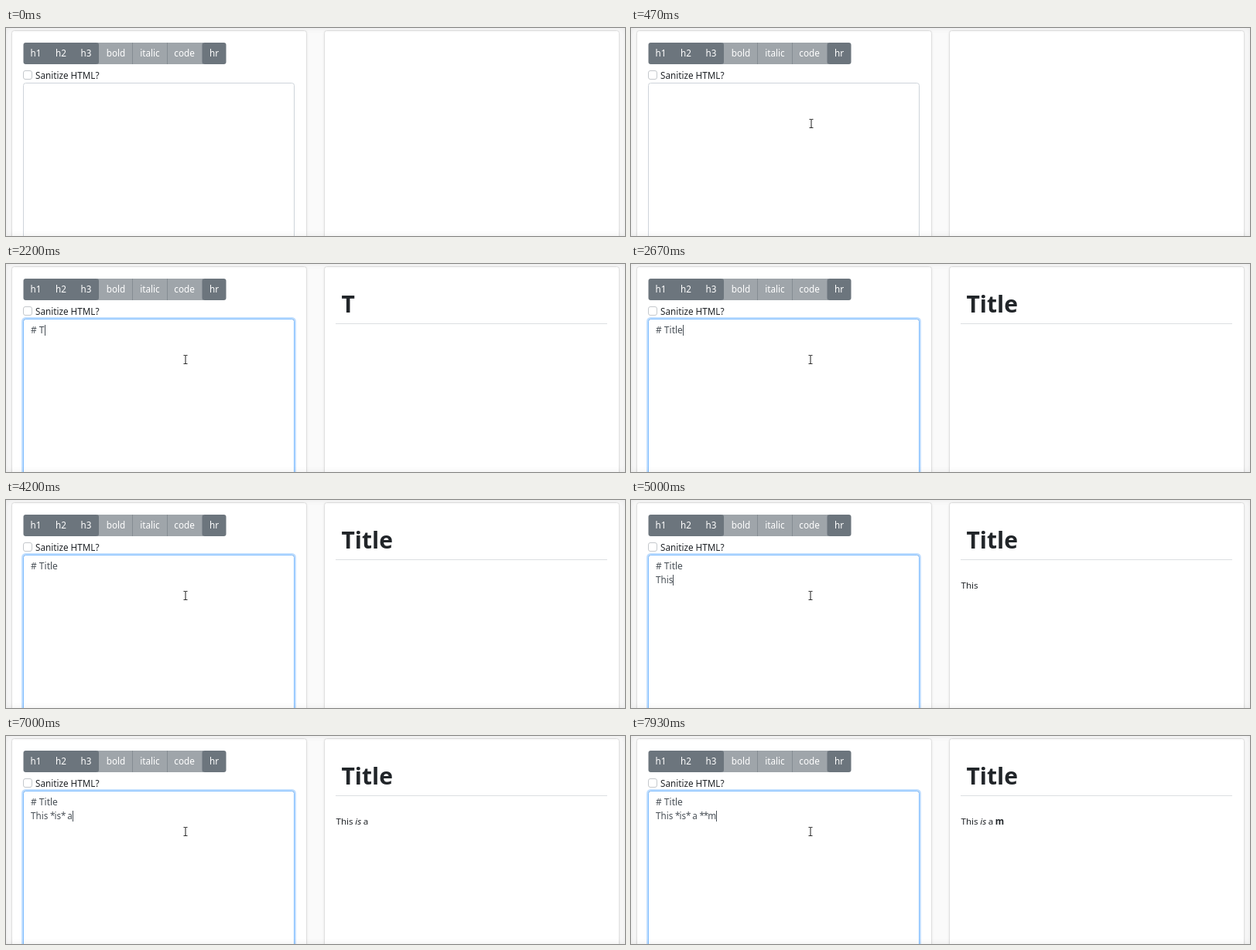
Recreate the animation shown at these times as an HTML page. Size 800 by 270 pixels, loop 8000 ms.

```html
<!DOCTYPE html>
<html lang="en">
<head>
<meta charset="utf-8">
<title>Markdown editor</title>
<style>
  html, body { margin: 0; width: 100%; height: 100%; overflow: hidden; background: #fafafa; }
  svg { display: block; width: 100%; height: 100%; }
  text { font: 11.7px "Noto Sans", "Open Sans", sans-serif; white-space: pre; fill: #212529; }
  .card { fill: #fff; stroke: #dfdfdf; filter: drop-shadow(0 1px 1.5px rgba(0, 0, 0, .07)); }
  .btn text { fill: #fff; text-anchor: middle; }
  .src text { fill: #495057; word-spacing: -.3px; }
  .src .first { font-size: 12px; word-spacing: 0; }
  .star { letter-spacing: -1.1px; }
  .title { font-size: 30px; font-weight: 600; }
  .para { font-size: 11.6px; word-spacing: -.5px; }
  .em { font-style: italic; }
  .strong { font-weight: 700; }
  .vignette { position: fixed; inset: 0; pointer-events: none; box-shadow: inset 0 0 8px rgba(0, 0, 0, .08); }
</style>
</head>
<body>
<svg viewBox="0 0 800 270">
  <rect class="card" x="7.5" y="3.5" width="381" height="300" rx="3"/>
  <rect class="card" x="411.5" y="3.5" width="381" height="300" rx="3"/>

  <g class="btn">
    <rect x="118" y="19" width="137" height="28" fill="#9fa5aa"/>
    <path d="M163.5 19v28M208.5 19v28" stroke="#858c93"/>
    <rect x="22.5" y="19" width="97.5" height="28" rx="3" fill="#6c757d"/>
    <rect x="253.5" y="19" width="31" height="28" rx="3" fill="#6c757d"/>
    <text x="38.5" y="37">h1</text>
    <text x="71" y="37">h2</text>
    <text x="103.5" y="37">h3</text>
    <text x="142" y="37">bold</text>
    <text x="186" y="37">italic</text>
    <text x="230.5" y="37">code</text>
    <text x="269" y="37">hr</text>
  </g>

  <rect x="22.5" y="55.5" width="11" height="11" rx="2.5" fill="#fff" stroke="#c4c8cc"/>
  <text x="38" y="66">Sanitize HTML?</text>

  <rect id="ring" x="21.3" y="70.3" width="352.4" height="240" rx="4" fill="none" stroke="#007bff" stroke-width="2.4" stroke-opacity=".25"/>
  <rect x="22.5" y="71.5" width="350" height="240" rx="3" fill="#fff" stroke="#ced4da"/>
  <rect id="edge" x="22.5" y="71.5" width="350" height="240" rx="3" fill="none" stroke="#80bdff"/>

  <g class="src">
    <text id="line1" class="first" x="32" y="89.5"/>
    <text id="line2" x="32" y="107.5"/>
  </g>
  <rect id="caret" width="1" height="14" fill="#495057"/>

  <text id="title" class="title" x="433.5" y="62.5"/>
  <path id="rule" d="M426 .5H777" stroke="#dcdfe2"/>
  <text id="para" class="para" x="426.5" y="115"/>

  <g id="pointer">
    <path id="arrow" d="M0 0v13l3-2.8 2 4.6 2.2-1-2-4.4h4z" fill="#222" stroke="#fff" stroke-width=".8"/>
    <g id="beam" fill="none">
      <path d="M-2.5-5.5H-1Q0-5.5 0-4.5V4.5Q0 5.5-1 5.5H-2.5M2.5-5.5H1Q0-5.5 0-4.5V4.5Q0 5.5 1 5.5H2.5" stroke="#fff" stroke-width="2.6"/>
      <path d="M-2.5-5.5H-1Q0-5.5 0-4.5V4.5Q0 5.5-1 5.5H-2.5M2.5-5.5H1Q0-5.5 0-4.5V4.5Q0 5.5 1 5.5H2.5" stroke="#333" stroke-width="1.1"/>
    </g>
  </g>
</svg>
<div class="vignette"></div>
<script>
const LOOP = 8000, STEP = 1000 / 15, FOCUS = 600;
const SOURCE = '# Title\nThis *is* a **m';
const KEYS = [1400, 1800, 2200, 2330, 2470, 2600, 2670, 3000,
  4530, 4730, 4870, 5000, 5330, 5530, 5930, 6070, 6400,
  6600, 7000, 7200, 7400, 7530, 7800];
const CARET_OFF = [[0, FOCUS + 60], [3000, 3270], [4200, 4530]];

const $ = id => document.getElementById(id);
const show = (id, on) => $(id).setAttribute('visibility', on ? 'inherit' : 'hidden');
const clamp = v => Math.min(1, Math.max(0, v));
const smooth = p => p * p * (3 - 2 * p);
const span = (text, cls) => text && `<tspan class="${cls}">${text}</tspan>`;

const markStars = s => s.replace(/\*/g, span('*', 'star'));

// An unclosed marker already formats the rest of the line.
const markdown = s => s
  .replace(/\*\*([^*]*)(\*\*|$)/g, (_, body) => span(body, 'strong'))
  .replace(/\*([^*]*)(\*|$)/g, (_, body) => span(body, 'em'));

let typed = -1;

function drawText(count) {
  if (count === typed) return;
  typed = count;
  const [head, body] = SOURCE.slice(0, count).split('\n');
  const second = body !== undefined;
  const heading = head.slice(2);
  $('line1').textContent = head;
  $('line2').innerHTML = markStars(body || '');
  $('title').textContent = heading;
  $('para').innerHTML = markdown(body || '');
  show('rule', count > 0);
  $('rule').setAttribute('transform', `translate(0 ${heading ? 77 : 41})`);
  const line = $(second ? 'line2' : 'line1');
  const width = line.textContent ? line.getComputedTextLength() : 0;
  $('caret').setAttribute('x', Math.round(32 + width));
  $('caret').setAttribute('y', second ? 97 : 79);
}

function drawPointer(t) {
  const now = Math.floor(t / STEP + .1) * STEP;
  const left = (1 - clamp((now - STEP) / (6 * STEP))) ** 2;
  const x = (now < FOCUS ? 233 : 232) + 558 * left;
  const y = 124 - 112 * left;
  const overText = x < 373 && y > 71;
  show('pointer', now >= STEP - 1);
  show('arrow', !overText);
  show('beam', overText);
  $('pointer').setAttribute('transform', `translate(${x} ${y})`);
}

function draw(t) {
  const focus = smooth(clamp((t - FOCUS) / 150));
  $('ring').setAttribute('opacity', focus);
  $('edge').setAttribute('opacity', focus);
  drawText(KEYS.filter(k => k <= t).length);
  show('caret', !CARET_OFF.some(([from, to]) => t >= from && t < to));
  drawPointer(t);
}

const start = performance.now();
function tick() {
  draw((performance.now() - start) % LOOP);
  requestAnimationFrame(tick);
}
tick();
</script>
</body>
</html>
```
